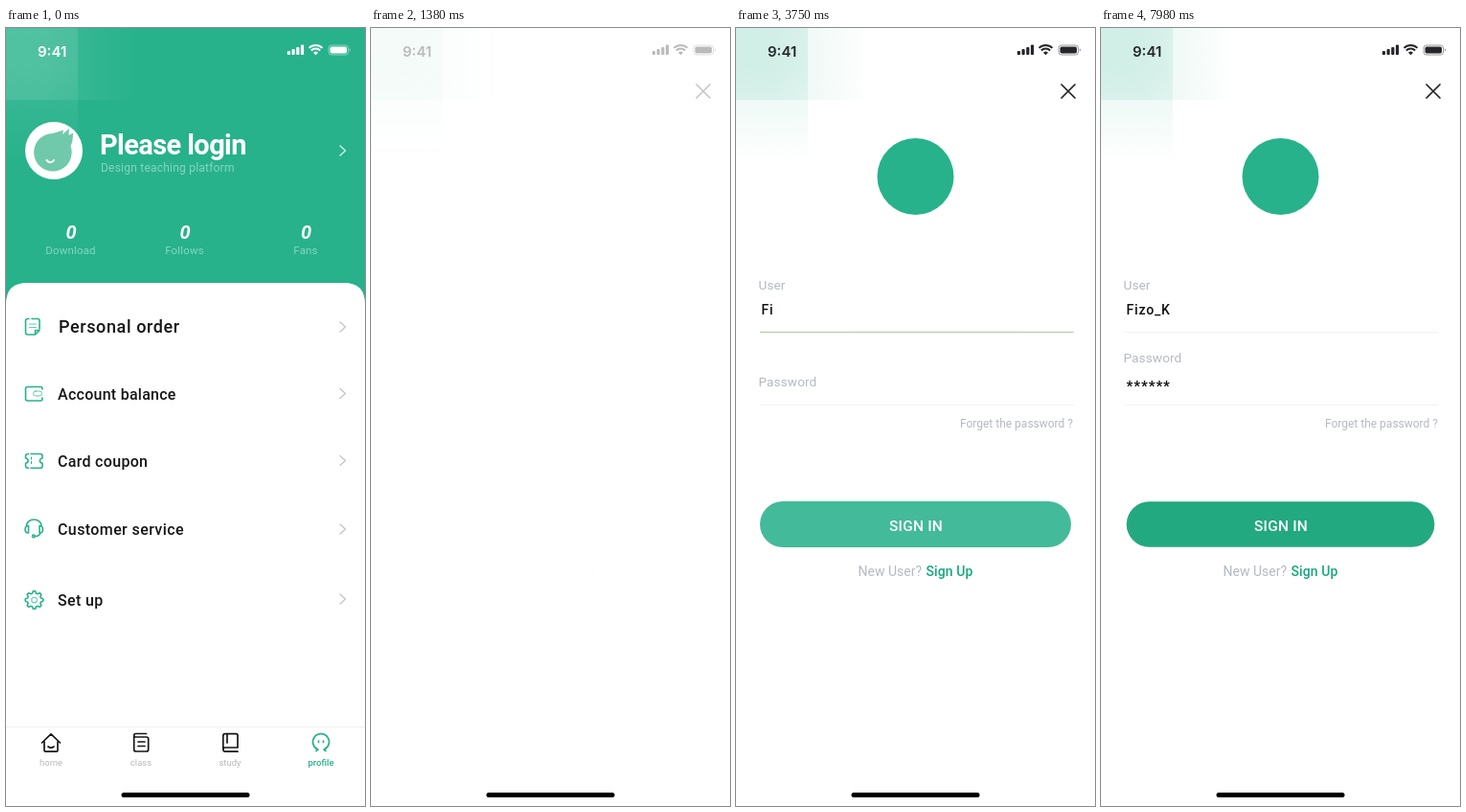
An HTML page that plays this animation: 375x812 px, repeating every 8000 ms.

```html
<!DOCTYPE html>
<html lang="en">
<head>
<meta charset="utf-8">
<title>Sign in</title>
<style>
html, body { margin: 0; width: 100%; height: 100%; overflow: hidden; background: #fff; }
svg { display: block; width: 100vw; height: 100vh; font-family: Roboto, sans-serif; }
.m { font-weight: 500; }
.line { fill: none; stroke-linecap: round; stroke-linejoin: round; }
.pale { fill: #b5b9c3; }
</style>
</head>
<body>
<svg id="stage" viewBox="0 0 375 812"></svg>
<script>
const LOOP = 8000, GREEN = '#27b28b';
const USER = 'Fizo_K', SECRET = '******';

// Markup helpers
const text = (x, y, size, str, attrs = '') =>
  `<text x="${x}" y="${y}" font-size="${size}" ${attrs}>${str}</text>`;
const chevron = (x, y, color) =>
  `<path class="line" d="M${x} ${y - 5}l5.5 5l-5.5 5" stroke="${color}" stroke-width="1.4"/>`;
const fade = (id, dir, color, a) => `
  <linearGradient id="${id}" ${dir}><stop offset=".3" stop-color="${color}" stop-opacity="${a}"/>
    <stop offset="1" stop-color="${color}" stop-opacity="0"/></linearGradient>`;
const corner = (id, color, a) =>
  fade(id + 'V', 'x2="0" y2="1"', color, a) + fade(id + 'H', '', color, a) +
  `<rect width="75" height="142" fill="url(#${id}V)"/><rect width="140" height="75" fill="url(#${id}H)"/>`;
const typed = (id, x, y, size, space, weight, str) =>
  `<text id="${id}" font-weight="${weight}" x="${x}" y="${y}" font-size="${size}" letter-spacing="${space}" fill="#111">` +
  [...str].map(c => `<tspan>${c}</tspan>`).join('') + '</text>';

const gear = () => {
  const pts = Array.from({ length: 48 }, (_, i) => {
    const a = i / 48 * 2 * Math.PI, r = 8.3 + 1.1 * Math.tanh(3 * Math.cos(8 * a));
    return (29.5 + r * Math.cos(a)).toFixed(2) + ' ' + (597 + r * Math.sin(a)).toFixed(2);
  });
  return 'M' + pts.join('L') + 'Z';
};

const rows = [
  [318, 18, .6, 'Personal order', 312],
  [388, 16, .25, 'Account balance', 381.5],
  [458, 16, .3, 'Card coupon', 451.5],
  [529, 16, .4, 'Customer service', 523],
  [602.5, 16, .35, 'Set up', 596],
].map(([y, size, space, label, mid]) =>
  text(55 - (size < 18), y, size, label, `class="m" fill="#161616" letter-spacing="${space}"`) +
  chevron(349, mid, '#c6c6ca')).join('');

const stats = [[68, 'Download'], [187, 'Follows'], [313.5, 'Fans']].map(([x, label]) =>
  text(x, 220, 20, '0', 'font-weight="700" font-style="italic" fill="#fff" text-anchor="middle"') +
  text(x - .5, 236.3, 11.5, label, 'fill="#fff" fill-opacity=".45" text-anchor="middle" letter-spacing=".15"')).join('');

const tabs = [[47, 'home'], [141, 'class'], [234, 'study'], [329, 'profile']].map(([x, label], i) =>
  text(x, 769.5, 9.5, label, `text-anchor="middle" fill="${i < 3 ? '#b9b9bd' : GREEN}" ${i < 3 ? '' : 'class="m"'}`)).join('');

const menuIcons = `
  <g class="line" stroke="${GREEN}" stroke-width="1.6">
    <path d="M24 303.5h-1.5q-2 0-2 2v12.5q0 2 2 2h7.5M27 303.5h6q2 0 2 2v8.5M35 315.5l-4.5 4.5v-4.5z"/>
    <path d="M24.5 309h7M24.5 312.5h7" stroke-width="1" opacity=".7"/>
    <path d="M38 377v-.5q0-2-2-2h-13.5q-2 0-2 2v10.5q0 2 2 2h13.5q2 0 2-2v-1"/>
    <rect x="28.5" y="379" width="9" height="5" rx="2.5" stroke-width="1" opacity=".7"/>
    <path d="M26 444.5h10q2 0 2 2v2.5a2.6 2.6 0 0 0 0 5.2v3q0 2-2 2h-10M23.5 444.5q-3 0-3 2v2.5a2.6 2.6 0 0 1 0 5.2v3q0 2 3 2"/>
    <path d="M26.5 448v8" stroke-dasharray="2 2.5" stroke-width="1.2"/>
    <path d="M21.5 520v-.5a7.7 6.5 0 0 1 15.4 0v.5M23.5 519.5v7.5q-3.5 0-3.5-3.7t3.5-3.8M35 519.5v7.5q3.5 0 3.5-3.7t-3.5-3.8M36 527q-1 3.5-5.5 3.5"/>
    <circle cx="28.8" cy="530.4" r="1.3"/>
    <path d="${gear()}"/><circle cx="29.5" cy="597" r="2.8" stroke-width="1.1" opacity=".7"/>
  </g>`;

const tabIcons = `
  <g class="line" stroke="#161616" stroke-width="1.7">
    <path d="M37.5 746l9.5-9.2l9.5 9.2M40 744.5v9.5q0 1.2 1.2 1.2h11.6q1.2 0 1.2-1.2v-9.5M44 750q3 2.5 6 0"/>
    <path d="M146 740h-10.5a1.6 1.6 0 0 1 0-3.5h11M133.7 738.5v14.5q0 2 2 2h11q2 0 2-2v-11q0-2-2-2M138 745h7M138 749.5h7"/>
    <path d="M242 751v-12.5q0-1.8-1.8-1.8h-11.2q-2.2 0-2.2 2.2v14M242 751h-13a2.1 2.1 0 0 0 0 4.2h13M231 737v9"/>
    <path stroke="${GREEN}" d="M324 754.5l2-1.5a8.5 8.5 0 1 1 6 0l2 1.5M326.5 744v1.5M331.5 744v1.5"/>
  </g>`;

const profile = `
  <g id="profile">
    <rect width="375" height="812" fill="#fff"/>
    <rect width="375" height="300" fill="${GREEN}"/>
    ${corner('p', '#fff', .1)}
    <circle cx="50" cy="128" r="30" fill="#fff"/>
    <path d="M49 110L60 106.5L59 111L66 105L65.5 112L70 109.5Q70 119 67.5 123A19.8 19.8 0 1 1 49 110Z" fill="#70c9aa"/>
    <path class="line" d="M42.5 138q4 4.5 7.5 0" stroke="#fff" stroke-width="2"/>
    ${text(98, 131.5, 29, 'Please login', 'font-weight="700" fill="#fff" letter-spacing="-.6"')}
    ${text(99, 150, 12, 'Design teaching platform', 'fill="#fff" fill-opacity=".45" letter-spacing=".22"')}
    ${chevron(349, 128, '#d4f0e7')}
    ${stats}
    <path d="M0 812V288Q0 266 22 266H353Q375 266 375 288V812Z" fill="#fff"/>
    ${rows}${menuIcons}
    <path d="M0 729.5H375" stroke="#f1f1f3"/>
    ${tabs}${tabIcons}
  </g>`;

const field = id => `
  <path id="${id}Base" fill="none" stroke="#f2f2f4" stroke-width="1.2"/>
  <path id="${id}Line" fill="none" stroke-width="1.4"/>`;

const login = `
  <rect id="sheet" width="375" height="812" fill="#fff"/>
  <g id="login">
    ${corner('l', GREEN, .11)}
    <path class="line" d="M340 59l14 14M354 59l-14 14" stroke="#222" stroke-width="1.7"/>
    <g id="form">
      <circle cx="187.5" cy="155" r="40" fill="${GREEN}"/>
      ${field('user')}${field('pass')}
      <g id="userLabel">${text(23.5, 298, 13.6, 'User', 'class="pale" letter-spacing=".1"')}</g>
      <g id="passLabel">${text(23.5, 374, 13.6, 'Password', 'class="pale" letter-spacing=".1"')}</g>
      ${typed('userText', 26.5, 298.5, 14, .8, 500, USER)}
      ${typed('passText', 26.5, 378.7, 15, .9, 700, SECRET)}
      ${text(352, 416.5, 12, 'Forget the password ?', 'class="pale" text-anchor="end"')}
      <rect id="button" x="25" y="494" width="325" height="48" rx="24"/>
      ${text(188, 524.5, 15.5, 'SIGN IN', 'id="signIn" class="m" text-anchor="middle" letter-spacing=".2"')}
      ${text(127.5, 572, 14, 'New User?', 'class="pale"')}
      ${text(198.5, 572, 14, 'Sign Up', 'class="m" fill="#14a87c" letter-spacing=".1"')}
    </g>
  </g>
  <linearGradient id="touchFill" x2="0" y2="1"><stop stop-color="#f8f8f8"/><stop offset="1" stop-color="#d9d9d9"/></linearGradient>
  <circle id="touch" cx="131.5" r="14.4" fill="url(#touchFill)" stroke="#d6d6d6" stroke-width=".8"/>`;

const status = `
  <g id="status">
    ${text(33, 30, 15, '9:41', 'font-weight="600" style="font-family:Inter,sans-serif"')}
    ${[4, 6, 8, 10.5].map((h, i) => `<rect x="${293.8 + i * 4.7}" y="${28 - h}" width="3.2" height="${h}" rx=".9"/>`).join('')}
    <path d="M323.5 28.3l-2.5-2.6a3.7 3.7 0 0 1 5 0z"/>
    <path fill="none" stroke="currentColor" stroke-width="1.9" d="M318.8 23.5a6.7 6.7 0 0 1 9.4 0M316.5 20.9a10 10 0 0 1 14 0"/>
    <rect x="337" y="18" width="20.5" height="10" rx="3" fill="none" stroke="currentColor" opacity=".45"/>
    <rect x="338.5" y="19.5" width="17.5" height="7" rx="1.7"/>
    <path d="M358.8 21.3q2.4 1.7 0 3.4z" opacity=".5"/>
  </g>`;

document.getElementById('stage').innerHTML = profile +
  '<rect id="shade" width="375" height="812"/>' + login + status +
  '<rect x="120.5" y="798" width="134" height="5" rx="2.5"/>';

// Motion helpers
const el = id => document.getElementById(id);
const set = (id, attrs) => { for (const k in attrs) el(id).setAttribute(k, attrs[k]); };
const ramp = (t, a, b) => Math.min(1, Math.max(0, (t - a) / (b - a)));
const smooth = u => u * u * (3 - 2 * u);
const out = u => 1 - (1 - u) ** 3;
const mix = (a, b, u) => `rgb(${a.map((v, i) => Math.round(v + (b[i] - v) * u))})`;

// Line sag after focus: pulled down, then released as a damped spring
const sag = t => t < 780
  ? 15.2 * smooth(ramp(t, 580, 780))
  : 15.2 * Math.exp(-(t - 780) / 140) * Math.cos((t - 780) * 2 * Math.PI / 320);

function drawField(id, t, y, focus, blur) {
  const dt = t - focus, h = dt > 1570 ? 0 : sag(dt);
  const low = y + h * 4 / 3;
  const d = `M25 ${y}C140 ${low} 236 ${low} 352.5 ${y}`;
  set(id + 'Base', { d });
  set(id + 'Line', {
    d,
    stroke: mix([140, 215, 190], [186, 211, 177], ramp(dt, 800, 1300)),
    opacity: ramp(dt, 60, 400) * (1 - ramp(t, blur, blur + 300)),
  });
  const lift = 25 * out(ramp(dt, 780, 1060));
  const tilt = h * .62 * (1 - ramp(dt, 780, 1060));
  set(id + 'Label', { transform: `translate(0 ${-lift}) rotate(${tilt} 24 ${y - 20})` });
}

function drawTyping(id, t, start) {
  [...el(id).children].forEach((c, i) =>
    c.setAttribute('fill-opacity', ramp(t, start + i * 120 - 30, start + i * 120 + 30)));
}

function draw(t) {
  const rise = smooth(ramp(t, 90, 1386));
  const scale = 1 - .041 * rise;
  set('profile', { transform: `translate(${187.5 * (1 - scale)} ${32.6 * rise}) scale(${scale})` });
  set('shade', { opacity: .16 * rise });
  set('sheet', { y: 812 * (1 - rise) });

  set('login', { opacity: smooth(ramp(t, 1250, 1650)) });
  set('form', {
    opacity: smooth(ramp(t, 1320, 2010)),
    transform: `translate(0 ${6 * (1 - out(ramp(t, 1300, 1690)))})`,
  });
  const ink = mix([255, 255, 255], [38, 38, 43], smooth(ramp(t, 1250, 1600)));
  set('status', { fill: ink, color: ink });

  drawField('user', t, 317.5, 2400, 4680);
  drawField('pass', t, 393.5, 4700, 7500);
  drawTyping('userText', t, 3540);
  drawTyping('passText', t, 6090);

  const first = t < 4500;
  const shown = first ? (t >= 2400) * (1 - ramp(t, 2430, 2660)) : 1 - ramp(t, 4660, 4900);
  set('touch', { cy: first ? 292.5 : 368, opacity: shown });

  const ready = ramp(t, 3450, 3800), press = smooth(ramp(t, 7720, 7980));
  set('button', {
    fill: ready < 1 ? mix([238, 238, 238], [39, 178, 139], ready)
                    : mix([39, 178, 139], [35, 169, 127], press),
    transform: `translate(187.5 518) scale(${1 - .01 * press}) translate(-187.5 -518)`,
  });
  set('signIn', { fill: mix([102, 102, 106], [255, 255, 255], ramp(t, 3450, 3700)) });
}

const begin = performance.now();
function tick() {
  draw((performance.now() - begin) % LOOP);
  requestAnimationFrame(tick);
}
tick();
</script>
</body>
</html>
```
